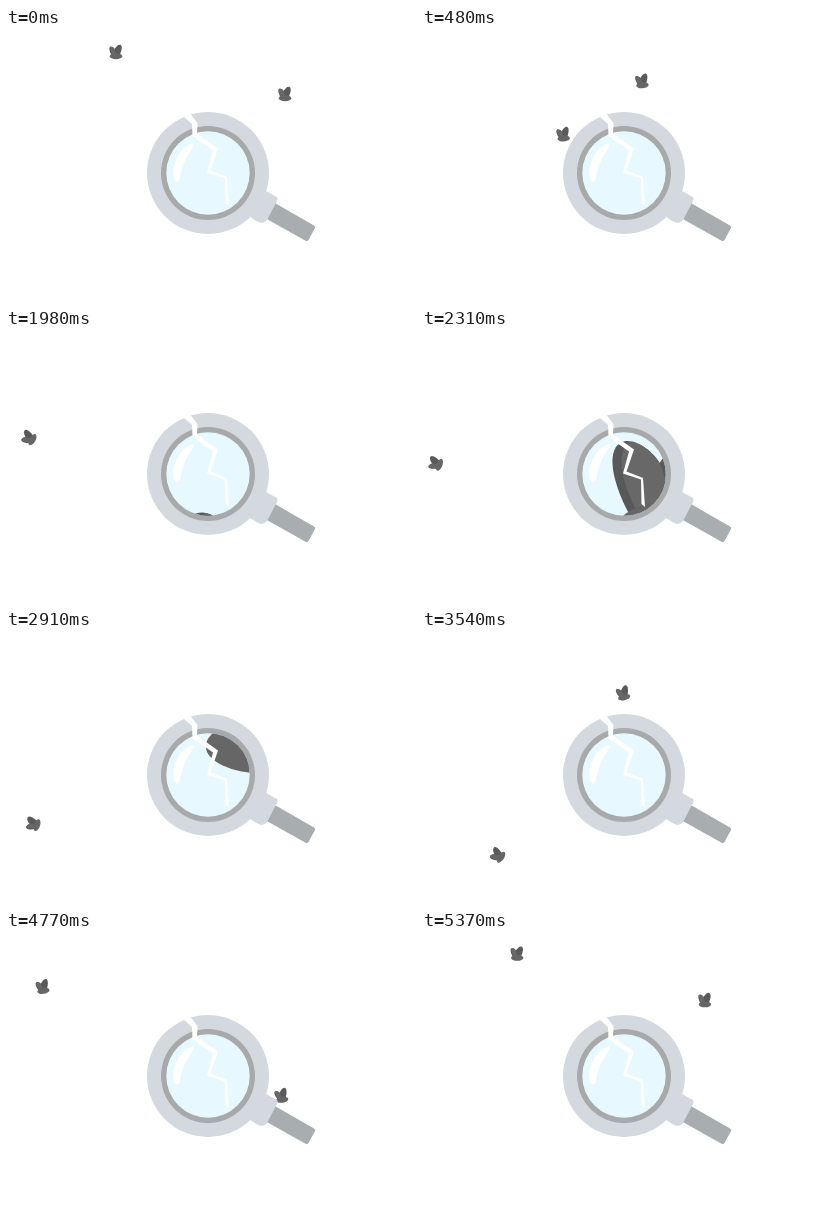
Write an HTML page with a canvas that moves like this. It is 410 px wide and 273 px high and loops after 5.4 s.

```html
<!DOCTYPE html>
<html lang="en">
<head>
<meta charset="utf-8">
<title>Cracked magnifier</title>
<style>
html, body { margin: 0; width: 100%; height: 100%; overflow: hidden; background: #fff; }
canvas { display: block; width: 410px; height: 273px; }
</style>
</head>
<body>
<canvas id="stage"></canvas>
<script>
const W = 410, H = 273, LOOP = 5400, STEP = 30;
const LENS = { x: 202, y: 145, r: 61, rim: 47, glass: 41.7, zoom: 2 };
const FLY_ZOOM = 9;
const canvas = document.getElementById('stage');
const ctx = canvas.getContext('2d');
const dpr = window.devicePixelRatio || 1;
canvas.width = W * dpr;
canvas.height = H * dpr;

// Each fly follows a smooth curve through points evenly spaced in time.
// phase runs from 0 to 2 pi over the loop; tilt is in degrees.
const searcher = {
  points: [[110, 24], [146, 128], [151, 243], [213, 200], [227, 138],
    [227, 99], [196, 62], [117, 87], [36, 54], [102, 21]],
  tilt: phase => -10 * (1 - Math.cos(2 * phase))
};
const circler = {
  points: [[279, 66], [203, 53], [104, 72], [34, 97], [13, 142],
    [32, 201], [83, 227], [188, 244], [278, 160], [281, 64]],
  tilt: phase => -36 * (1 - Math.cos(phase))
};

// Catmull-Rom curve; the ends continue as parabolas
function curve(points, u, axis) {
  const at = i => {
    const n = points.length - 1;
    if (i < 0) return 3 * (at(0) - at(1)) + at(2);
    if (i > n) return 3 * (at(n) - at(n - 1)) + at(n - 2);
    return points[i][axis];
  };
  const s = u * (points.length - 1), i = Math.floor(s), f = s - i;
  const [a, b, c, d] = [at(i - 1), at(i), at(i + 1), at(i + 2)];
  return b + f / 2 * (c - a + f * (2 * a - 5 * b + 4 * c - d + f * (3 * (b - c) + d - a)));
}

function pose(fly, u) {
  return {
    x: curve(fly.points, u, 0),
    y: curve(fly.points, u, 1),
    tilt: fly.tilt(u * 2 * Math.PI) * Math.PI / 180
  };
}

function fillPath(d, color) {
  ctx.fillStyle = color;
  ctx.fill(new Path2D(d));
}

function disc(r, color) {
  ctx.fillStyle = color;
  ctx.beginPath();
  ctx.arc(LENS.x, LENS.y, r, 0, Math.PI * 2);
  ctx.fill();
}

const LEFT_WING = 'M-2 8 C-5 5 -7.6 -1 -6.3 -3.2 C-5.2 -5 -2.4 -3.2 -1.4 -1.5 C-.4 .5 0 5 -.5 8Z';
const RIGHT_WING = 'M-1 8 C-2.5 4 -2.5 -.5 -.9 -2.2 C.2 -3.5 2 -6 4.2 -5.6 C7 -5 6 1 2 8Z';

function drawFly(x, y, tilt, scale, lift) {
  ctx.save();
  ctx.translate(x, y);
  ctx.rotate(tilt);
  ctx.scale(scale, scale);
  ctx.translate(0, -lift);
  fillPath(RIGHT_WING, '#5a5a5a');
  fillPath(LEFT_WING, '#585858');
  ctx.save();
  ctx.clip(new Path2D(LEFT_WING));
  ctx.translate(1, 0);
  fillPath(LEFT_WING, '#686868');
  ctx.restore();
  ctx.fillStyle = '#666';
  ctx.beginPath();
  ctx.ellipse(0, 5.8, 6.2, 3, 0, 0, Math.PI * 2);
  ctx.fill();
  ctx.restore();
}

function drawSmall(p) {
  drawFly(p.x, p.y, p.tilt, 1, 1.6);
}

function drawMagnified(p) {
  ctx.save();
  ctx.beginPath();
  ctx.arc(LENS.x, LENS.y, LENS.glass, 0, Math.PI * 2);
  ctx.clip();
  const x = LENS.x + (p.x - LENS.x) * LENS.zoom;
  const y = LENS.y + (p.y - LENS.y) * LENS.zoom;
  drawFly(x, y, 0, FLY_ZOOM, 0);
  ctx.restore();
}

function drawLens(p) {
  fillPath('M268 174.5 L308 197.5 Q310 198.5 309 200 L302.5 212 Q301.5 213.5 300 213 L259 190Z', '#a8adb0');
  fillPath('M243 188 Q252 195 256 195 Q259 195 261 192 L271 173 Q273 169 269 168 L262 164 L254 160Z', '#d4d9e0');
  disc(LENS.r, '#d4d9e0');
  disc(LENS.rim, '#a7a9aa');
  disc(LENS.glass, '#e7f9ff');
  drawMagnified(p);
  fillPath('M188 115 C175 117 165 135 168 150 C169 155 173 154 174 150 C176 138 180 128 188 118Z', '#fff');
  fillPath('M178 89 L186 96 L186.5 108 L207 122.5 L201 144.5 L219 150.5 L219.5 175 L223 178 L221 149 L204.5 142.5 L212 120.5 L191 105.5 L191.5 95 L183 84Z', '#fff');
}

function draw(now) {
  const u = Math.floor((now % LOOP) / STEP) * STEP / LOOP;
  const near = pose(searcher, u);
  ctx.setTransform(dpr, 0, 0, dpr, 0, 0);
  ctx.fillStyle = '#fff';
  ctx.fillRect(0, 0, W, H);
  drawSmall(near);
  drawSmall(pose(circler, u));
  drawLens(near);
}

let start;
function tick(now) {
  if (start === undefined) start = now;
  draw(Math.max(now - start, 0));
  requestAnimationFrame(tick);
}
draw(0);
requestAnimationFrame(tick);
</script>
</body>
</html>
```
